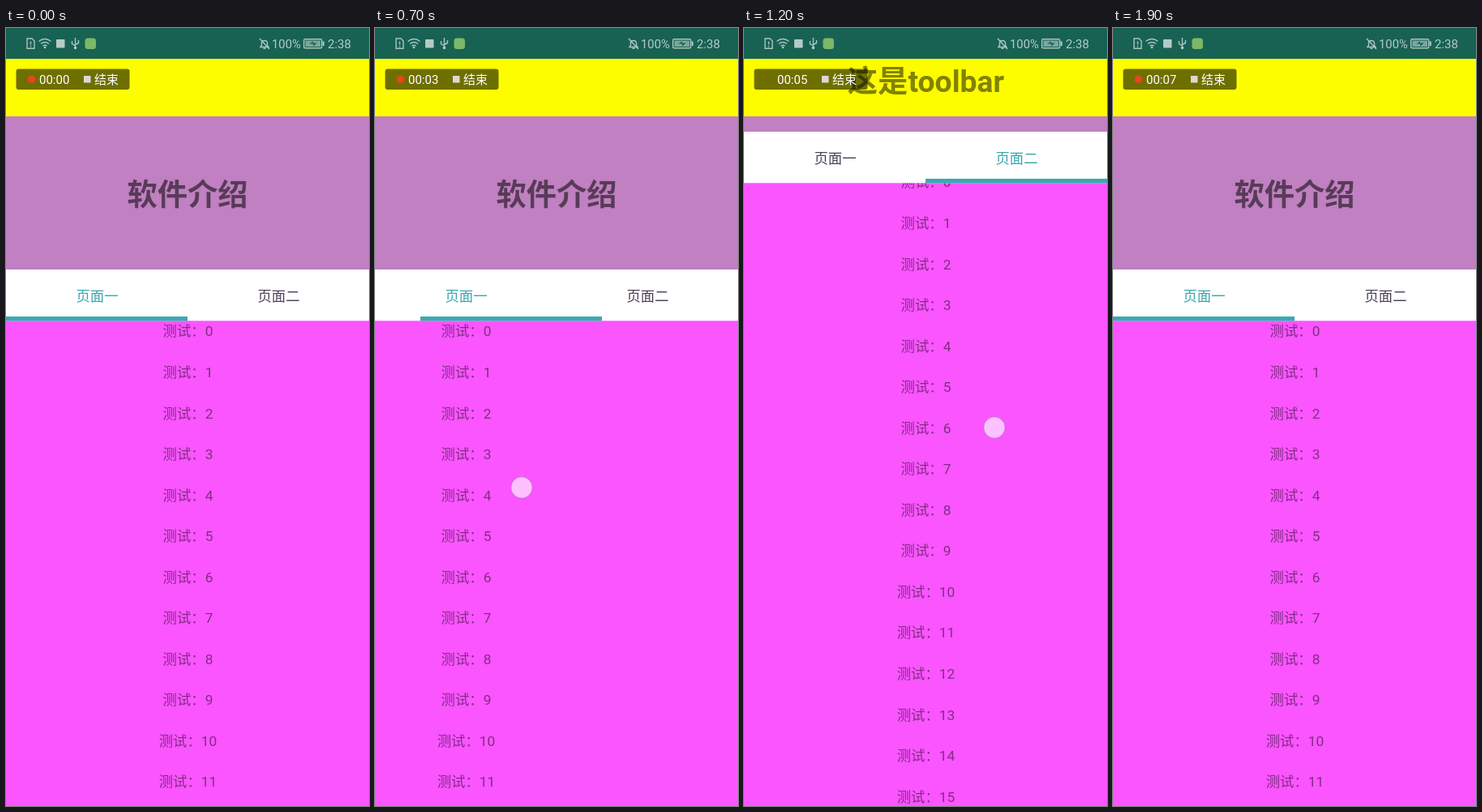
An HTML page for the animation above (2 s loop, 448 by 960 pixels).

```html
<!DOCTYPE html>
<html lang="zh-CN">
<head>
<meta charset="utf-8">
<style>
  html, body { margin: 0; width: 100%; height: 100%; overflow: hidden; }
  svg { display: block; width: 100%; height: 100%; }
  text { font-family: Roboto, "Noto Sans CJK SC", "Noto Sans CJK", sans-serif; }
  .row { font-size: 17.4px; fill: #000; fill-opacity: .48; text-anchor: middle; }
  .tab { font-size: 17.4px; text-anchor: middle; }
  .title { font-size: 37.3px; font-weight: 700; fill: #000; fill-opacity: .54; text-anchor: middle; }
  .line { fill: none; stroke: #a9c5bd; stroke-width: 1.4; }
  .solid { fill: #b4cbc4; }
  .small { font-size: 15px; fill: #fff; }
</style>
</head>
<body>
<svg viewBox="0 0 448 960" preserveAspectRatio="none">
  <rect width="448" height="960" fill="#fa55ff"/>
  <g id="page1"></g>
  <g id="page2"></g>

  <g id="header">
    <rect y="-100" width="448" height="398.5" fill="#c080c1"/>
    <text class="title" x="224" y="219">软件介绍</text>
    <rect y="298" width="448" height="63.3" fill="#fff"/>
    <text class="tab" id="tab1" x="112.5" y="336.5">页面一</text>
    <text class="tab" id="tab2" x="336.5" y="336.5">页面二</text>
    <rect id="indicator" y="356" width="224" height="5.4" fill="#3aa9b1"/>
  </g>

  <rect y="37" width="448" height="72" fill="#fdfd00"/>
  <text class="title" id="toolbar" x="224.5" y="79.3">这是toolbar</text>

  <rect width="448" height="38" fill="#186253"/>
  <g class="line">
    <path d="M26 13h6l3 3v9.300h-9zM30.500 16.500v4M30.500 22v1.500"/>
    <path d="M40.500 16.500q7.500-6 15 0M43 19.500q5-4 10 0M45.500 22.200q2.500-2 5 0"/>
    <path d="M85.500 12v13M81.500 16v3.500l4 2.500M89.500 15v3.500l-4 2"/>
    <path d="M314 23.500h10l-1.500-2v-4a4 4 0 0 0-7 0v4zM317.500 25.300h3M313 13l12 13"/>
    <rect x="367.700" y="13.700" width="22" height="11" rx="1.500"/>
  </g>
  <g class="solid">
    <circle cx="48" cy="24" r="1.300"/>
    <rect x="62" y="14" width="10.500" height="10.500" rx="1"/>
    <circle cx="85.500" cy="24.500" r="1.800"/>
    <rect x="369.500" y="15.500" width="18.500" height="7.500" opacity=".65"/>
    <rect x="390.700" y="16.500" width="2" height="5.500"/>
    <path d="M374 19.500l5-3v2h5l-5 4v-3z" fill="#186253"/>
    <text x="328" y="24.800" font-size="14.800">100%</text>
    <text x="397" y="24.800" font-size="15">2:38</text>
  </g>
  <rect x="97.500" y="12.500" width="13.500" height="13.500" rx="3.500" fill="#7db767"/>

  <rect x="12.500" y="50.500" width="140" height="25.500" rx="3" fill="#000" fill-opacity=".56"/>
  <circle id="record" cx="31.500" cy="63.300" r="4.900" fill="#e0491a"/>
  <text class="small" id="clock" x="41" y="69"></text>
  <rect x="96" y="59" width="8.500" height="8.500" fill="#dcd8d6"/>
  <text class="small" x="109" y="69.200">结束</text>

  <circle id="touch" r="13.200" fill="#fff" fill-opacity=".64" stroke="#a070b8" stroke-opacity=".6"/>
</svg>

<script>
const STEP = 100, STEPS = 20, PITCH = 50.55, WIDTH = 448;
const el = id => document.getElementById(id);

for (const id of ["page1", "page2"]) {
  el(id).innerHTML = Array.from({ length: 26 }, (_, i) =>
    `<text class="row" x="224.500" y="${380.4 + i * PITCH}">测试：${i}</text>`).join("");
}

// Keys are [step, value] pairs joined by straight lines.
const track = (...keys) => k => {
  const i = keys.findIndex(key => key[0] >= k);
  if (i < 0) return keys[keys.length - 1][1];
  if (i === 0) return keys[0][1];
  const [a, from] = keys[i - 1], [b, to] = keys[i];
  return from + (to - from) * (k - a) / (b - a);
};

const collapse = track([0, 0], [2, 189.5], [5, 189.5], [6, 0], [9, 0], [10, 115], [11, 189.5],
  [12, 170], [13, 189.5], [17, 189.5], [19, 0]);
const scroll1 = track([2, 0], [4, 190], [5, 152], [6, 60], [7, 0]);
const scroll2 = track([10, 0], [11, 14]);
const page = track([6, 0], [7, .25], [8, .8], [9, 1], [13, 1], [14, .9], [15, .998], [16, .6], [17, 0]);
const touchX = track([1, 235], [5, 232], [6, 240], [7, 181], [9, 200], [10, 205], [11, 255], [12, 309], [16, 330], [18, 235]);
const touchY = track([1, 620], [3, 330], [5, 413], [6, 580], [7, 567], [9, 620], [10, 514], [11, 440], [12, 493], [16, 450], [18, 600]);
const untouched = [0, 8, 13, 14, 15, 17, 19];

const move = (id, x, y) => el(id).setAttribute("transform", `translate(${x} ${y})`);

function draw(now) {
  const k = Math.floor(now / STEP) % STEPS;
  const c = collapse(k), p = page(k);

  move("page1", -p * WIDTH, -c - scroll1(k));
  move("page2", (1 - p) * WIDTH, -c - scroll2(k));
  move("header", 0, -c);
  move("touch", touchX(k), touchY(k));
  el("touch").style.display = untouched.includes(k) ? "none" : "";

  el("indicator").setAttribute("x", p * WIDTH / 2);
  el("tab1").setAttribute("fill", p < .5 ? "#38a6ad" : "#4c4058");
  el("tab2").setAttribute("fill", p < .5 ? "#4c4058" : "#38a6ad");
  el("toolbar").setAttribute("opacity", c / 189.5);

  el("clock").textContent = "00:0" + Math.floor(.4 * k + .3);
  el("record").style.display = k === 12 ? "none" : "";
  requestAnimationFrame(draw);
}
draw(performance.now());
</script>
</body>
</html>
```
